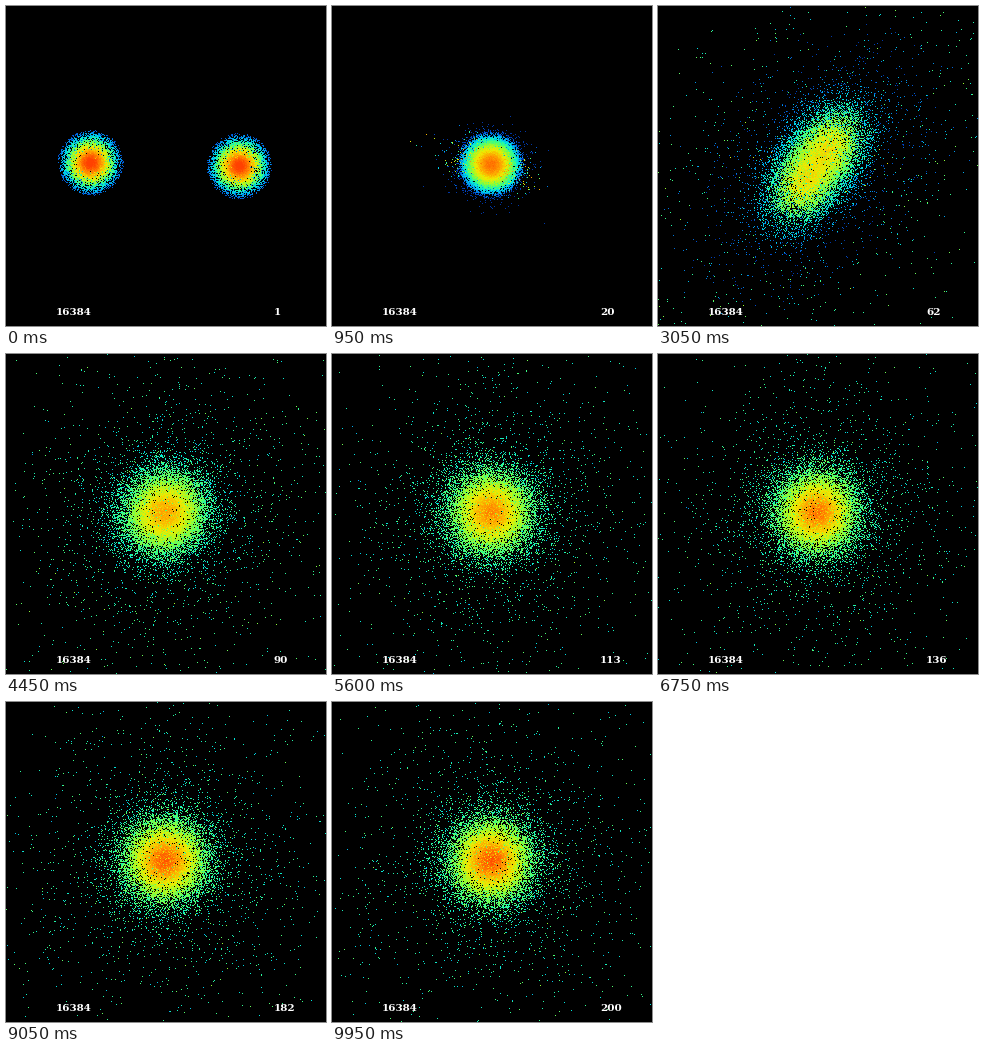
A matplotlib script for the animation above (10000 ms loop, 320x320 px).

```python
import numpy as np
import matplotlib.pyplot as plt
from matplotlib.animation import FuncAnimation
from matplotlib.colors import LinearSegmentedColormap

SIZE, STEPS, INTERVAL = 320, 200, 50
COUNT = 16384
HALO_SHARE = .15
MIDDLE = np.array([159, 158.5])

RAMP = LinearSegmentedColormap.from_list("heat", [
    "#00288c", "#0050d0", "#00a0f0", "#00e8e0", "#3cff82",
    "#a0fa28", "#f0eb00", "#ffa000", "#ff4100"])
LUT = (RAMP(np.linspace(0, 1, 256))[:, :3] * 255).astype(np.uint8)

rng = np.random.default_rng(7)


def smooth(x):
    x = np.clip(x, 0, 1)
    return x * x * (3 - 2 * x)


def bell(t, peak, width):
    return np.exp(-((t - peak) / width) ** 2)


def unit(v):
    return v / np.linalg.norm(v, axis=1, keepdims=True)


# Relative distances: a compact ball at first, later a Gaussian body and a halo
ball = 33 * rng.random(COUNT) ** .8
body = np.linalg.norm(rng.normal(size=(COUNT, 3)), axis=1)
halo = rng.gamma(3, size=COUNT)
in_halo = rng.random(COUNT) < HALO_SHARE

# Each particle circles in its own randomly tilted plane
axis_a = unit(rng.normal(size=(COUNT, 3)))
axis_b = unit(np.cross(axis_a, rng.normal(size=(COUNT, 3))))
phase = rng.uniform(0, 2 * np.pi, COUNT)
omega = .5 / (1 + np.where(in_halo, 40 * halo, 22 * body) / 12) ** 1.5
jitter = rng.normal(size=COUNT)
side = np.where(np.arange(COUNT) < COUNT // 2, 1, -1)

# Part of the halo is drawn out into tidal tails
in_tail = in_halo & (rng.random(COUNT) < .5)
pull = np.where(in_tail, side * rng.exponential(.6, COUNT), 0)
tail = pull[:, None] * np.array([70, 24])


def puffed(t):
    """0 for the tight clusters, 1 after their first encounter."""
    return smooth((t - 14) / 20)


def merged(t):
    return smooth((t - 48) / 50)


def swing(t):
    """Signed distance of the first cluster from the common centre."""
    if t < 20:
        return -74.5 * np.cos(np.pi / 2 * (t - 1) / 19)
    if t < 50:
        return 46 * np.sin(np.pi * (t - 20) / 30)
    return -27 * np.exp((50 - t) / 20) * np.sin(np.pi * (t - 50) / 20)


def radii(t):
    sigma = 17 + 5 * merged(t)
    reach = np.clip(.6 * t - 6, 16, 40)
    loose = np.where(in_halo, reach * halo, sigma * body)
    return ball + puffed(t) * (loose - ball)


def positions(t, r):
    angle = (phase + omega * t)[:, None]
    p = axis_a[:, :2] * np.cos(angle) + axis_b[:, :2] * np.sin(angle)
    p *= r[:, None]
    turn = np.radians(1.3 + 124 * smooth((t - 7) / 57))
    along = np.array([np.cos(turn), np.sin(turn)])
    p += .55 * bell(t, 60, 18) * (p @ along)[:, None] * along
    p += tail * puffed(t) * (1 - smooth((t - 40) / 45))
    return MIDDLE + p + side[:, None] * swing(t) * along


def heat(t, r):
    m, n = puffed(t), merged(t)
    hot = 1 - .3 * m + .3 * (1 - np.exp(-max(t - 37, 0) / 60))
    cold = -2.2 * (1 - m) + .43 * n
    spread = 58 - 13 * m - 11 * n
    v = cold + (hot - cold) * np.exp(-(r / spread) ** 2)
    v += .4 * bell(t, 62, 20) * smooth((r - 85) / 50)
    v += jitter * (.012 + .05 * np.minimum(r / 60, 1) ** 2)
    return np.clip(v, .05, 1)


def render(t):
    r = radii(t)
    xy = np.floor(positions(t, r)).astype(int)
    v = heat(t, r)
    order = np.argsort(v)  # hottest on top
    order = order[((xy >= 0) & (xy < SIZE)).all(axis=1)[order]]
    image = np.zeros((SIZE, SIZE, 3), np.uint8)
    x, y = xy[order].T
    image[y, x] = LUT[(v[order] * 255).astype(int)]
    return image


fig = plt.figure(figsize=(SIZE / 100, SIZE / 100), dpi=100, facecolor="black")
ax = fig.add_axes([0, 0, 1, 1])
ax.axis("off")
picture = ax.imshow(render(1), extent=(0, SIZE, SIZE, 0),
                    interpolation="nearest")
style = dict(color="white", family="DejaVu Serif", weight="bold",
             size=7.5, va="baseline", ha="left")
ax.text(50, 309, str(COUNT), **style)
counter = ax.text(268, 309, "1", **style)


def update(i):
    picture.set_data(render(i + 1))
    counter.set_text(str(i + 1))
    return picture, counter


anim = FuncAnimation(fig, update, frames=STEPS, interval=INTERVAL,
                     repeat=True, repeat_delay=0)
plt.show()
```
